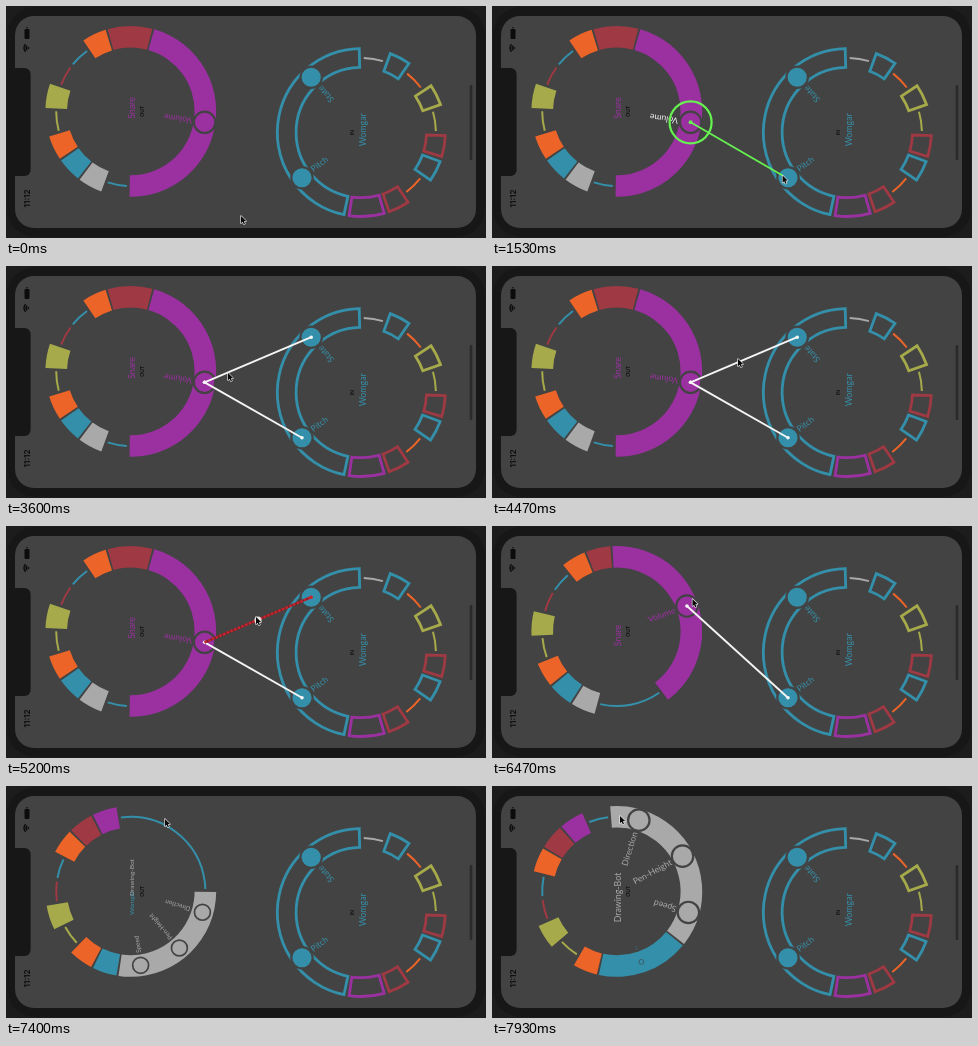
These frames come from a looping animation (480 px wide and 232 px high, 8000 ms). An HTML page with a canvas:

```html
<!DOCTYPE html>
<html lang="en">
<head>
<meta charset="utf-8">
<title>Ring mixer</title>
<style>
html, body { margin: 0; width: 100%; height: 100%; overflow: hidden; background: #181818; }
canvas { display: block; width: 480px; height: 232px; }
</style>
</head>
<body>
<canvas id="stage" width="480" height="232"></canvas>
<script>
const ctx = document.getElementById('stage').getContext('2d');
const LOOP = 8000, UNIT = 18, MID = 74.6, HALF = 10.8;
const BG = '#434343', INK = '#0c0c0c', GREEN = '#66f250', WHITE = '#f4f4f4';
const PURPLE = '#9b30a1', RED = '#9f3943', ORANGE = '#ec6428',
      LIME = '#a6aa4a', BLUE = '#3490aa', GRAY = '#a9a9a9';
const FONT = 'Lato, "Open Sans", sans-serif';

const item = (color, shape, name = '', knobs = []) => ({ color, shape, name, knobs });

const outRing = {
  x: 124.8, y: 105.4, base: 0, tag: 'OUT', tagX: 136,
  items: [
    item(PURPLE, 'fill', 'Snare', ['Volume']),
    item(BLUE, 'line', 'Womgar'),
    item(GRAY, 'fill', 'Drawing-Bot', ['Direction', 'Pen-Height', 'Speed']),
    item(BLUE, 'fill', '', ['Rate']),
    item(ORANGE, 'fill'), item(LIME, 'line'), item(LIME, 'fill'),
    item(RED, 'line'), item(BLUE, 'line'), item(ORANGE, 'fill'), item(RED, 'fill')
  ]
};
const inRing = {
  x: 355.3, y: 126.5, base: 179.3, tag: 'IN', tagX: 346,
  items: [
    item(BLUE, 'box', 'Womgar', ['Pitch', 'State']),
    item(GRAY, 'line'), item(BLUE, 'box'), item(ORANGE, 'line'),
    item(LIME, 'box'), item(LIME, 'line'), item(RED, 'box'),
    item(BLUE, 'box'), item(ORANGE, 'line'), item(RED, 'box'), item(PURPLE, 'box')
  ]
};

// [time, x, y] of the pointer tip
const pointerKeys = [
  [0, 235, 210], [70, 235, 210], [800, 198, 116], [950, 198, 116],
  [1500, 290.5, 169.5], [1750, 292, 170], [2200, 198, 116], [2320, 198, 116],
  [2950, 304, 72], [3130, 304, 72], [3600, 222, 107], [4250, 246, 93],
  [4500, 246, 93], [5200, 250, 91], [5400, 250, 91], [6130, 199, 112]
];
const dragKeys = [[6130, 199, 112], [6200, 200, 104], [6470, 200.5, 73],
  [6930, 184, 46.5], [7400, 159, 33], [7930, 128, 30]];
const turnKeys = [[6180, -0.085], [6470, 0.2], [6930, 0.59], [7400, 1.5], [7900, 2.285]];

const rad = a => (a - 90) * Math.PI / 180;
const clamp = v => Math.max(0, Math.min(1, v));
const ease = v => v * v * (3 - 2 * v);
const grow = focus => ease(clamp((focus - 0.1) / 0.6));
const polar = (ring, a, r) => [ring.x + r * Math.cos(rad(a)), ring.y + r * Math.sin(rad(a))];

function sample(keys, t, shape = v => v) {
  if (t <= keys[0][0]) return keys[0].slice(1);
  for (let i = 1; i < keys.length; i++) {
    const [a, b] = [keys[i - 1], keys[i]];
    if (t < b[0]) {
      const k = shape((t - a[0]) / (b[0] - a[0]));
      return a.slice(1).map((v, n) => v + (b[n + 1] - v) * k);
    }
  }
  return keys[keys.length - 1].slice(1);
}

function disc(x, y, r, fill, stroke, width) {
  ctx.beginPath();
  ctx.arc(x, y, r, 0, 7);
  if (fill) { ctx.fillStyle = fill; ctx.fill(); }
  if (stroke) { ctx.strokeStyle = stroke; ctx.lineWidth = width; ctx.stroke(); }
}

function line(from, to, color, width, dash = []) {
  ctx.strokeStyle = color;
  ctx.lineWidth = width;
  ctx.setLineDash(dash);
  ctx.beginPath();
  ctx.moveTo(...from);
  ctx.lineTo(...to);
  ctx.stroke();
  ctx.setLineDash([]);
}

function text(str, x, y, angle, size, color, align = 'center', weight = 400, font = FONT) {
  if (!str || size < 0.8) return;
  ctx.save();
  ctx.translate(x, y);
  ctx.rotate(angle);
  ctx.font = `${weight} ${size}px ${font}`;
  ctx.textAlign = align;
  ctx.textBaseline = 'middle';
  ctx.fillStyle = color;
  ctx.fillText(str, 0, 0);
  ctx.restore();
}

function panel(x, y, w, h, r, color) {
  ctx.fillStyle = color;
  ctx.beginPath();
  ctx.roundRect(x, y, w, h, r);
  ctx.fill();
}

// Places every item; the one at the turn position gets the wide half circle.
function layout(ring, turn) {
  const n = ring.items.length, first = Math.floor(turn), part = turn - first;
  let a = ring.base - part * UNIT;
  const spans = [];
  for (let i = 0; i < n; i++) {
    const index = (((first + i) % n) + n) % n;
    const focus = i === 0 ? 1 - part : i === 1 ? part : 0;
    const b = a + UNIT + focus * (180 - UNIT);
    spans[index] = { a, b, focus, shift: i === 0 ? part : part - 1 };
    a = b;
  }
  return spans;
}

function segment(ring, { a, b }, { color, shape }) {
  const path = (pad, inset) => {
    ctx.beginPath();
    ctx.arc(ring.x, ring.y, MID + HALF - inset, rad(a + pad), rad(b - pad));
    ctx.arc(ring.x, ring.y, MID - HALF + inset, rad(b - pad), rad(a + pad), true);
    ctx.closePath();
  };
  ctx.fillStyle = ctx.strokeStyle = color;
  if (shape === 'fill') {
    path(0.7, 0);
    ctx.fill();
  } else if (shape === 'box') {
    path(1.8, 1.4);
    ctx.lineWidth = 2.8;
    ctx.stroke();
  } else {
    ctx.lineWidth = 2;
    ctx.beginPath();
    ctx.arc(ring.x, ring.y, MID, rad(a + 1.5), rad(b - 1.5));
    ctx.stroke();
  }
}

const knobAngle = (span, i, n) => span.a + (span.b - span.a) * (i + 0.5) / n;

function drawRing(ring, spans, lit) {
  ring.items.forEach((it, i) => segment(ring, spans[i], it));
  ring.items.forEach((it, i) => {
    const span = spans[i], k = grow(span.focus);
    if (k <= 0) return;
    it.knobs.forEach((label, j) => {
      const a = knobAngle(span, j, it.knobs.length);
      disc(...polar(ring, a, MID), 10.7 * k, it.color, BG, 0.2 + 2 * k);
      const up = Math.cos(a * Math.PI / 180) >= 0;
      text(label, ...polar(ring, a, 62), rad(a) + (up ? 0 : Math.PI), 8.6 * k,
        lit === label ? WHITE : it.color, up ? 'right' : 'left');
    });
    text(it.name, ring.x + 1.6, ring.y - 1.2 + 25.5 * span.shift, -Math.PI / 2, 8.8 * k, it.color);
  });
  text(ring.tag, ring.tagX, ring.y, -Math.PI / 2, 5, '#111', 'center', 700);
}

function phone() {
  ctx.fillStyle = '#1c1c1c';
  ctx.fillRect(0, 0, 480, 232);
  panel(1, 1, 478, 230, 28, '#171717');
  panel(9, 10, 461, 212, 19, BG);
  panel(2, 62, 22.6, 108, 6, '#171717');
  panel(463.7, 79, 2.6, 75, 1.3, '#2a2a2a');
  text('11:12', 21.5, 192.5, -Math.PI / 2, 8.2, INK, 'center', 600, 'Inter, sans-serif');
  panel(18.5, 23, 5, 10, 1.2, INK);
  panel(20, 21.3, 2, 1, 0.5, INK);
  ctx.strokeStyle = INK;
  ctx.lineWidth = 1.6;
  for (const r of [1, 3.2, 5.4]) {
    ctx.beginPath();
    ctx.arc(23.5, 42, r, Math.PI * 0.76, Math.PI * 1.24);
    ctx.stroke();
  }
}

function pointer(x, y) {
  const shape = [[0, 0], [0, 7.2], [1.6, 5.7], [2.8, 8.2], [4, 7.7], [2.9, 5.2], [5.1, 5.1]];
  ctx.beginPath();
  shape.forEach(([dx, dy]) => ctx.lineTo(x + dx, y + dy));
  ctx.closePath();
  ctx.lineJoin = 'round';
  ctx.strokeStyle = '#e8e8e8';
  ctx.lineWidth = 1.3;
  ctx.stroke();
  ctx.lineJoin = 'miter';
  ctx.fillStyle = '#0a0a0a';
  ctx.fill();
}

function link(from, to, k) {
  if (k <= 0) return;
  ctx.globalAlpha = 0.5 + 0.5 * k;
  line(from, to, WHITE, 1.9 * k);
  disc(...from, 1.8 * k, WHITE);
  disc(...to, 1.8 * k, WHITE);
  ctx.globalAlpha = 1;
}

function draw(t) {
  const between = (a, b) => t >= a && t < b;
  const tip = t < 6130 ? sample(pointerKeys, t, ease) : sample(dragKeys, t);
  const left = layout(outRing, sample(turnKeys, t)[0]);
  const right = layout(inRing, -0.06);
  const dragging = between(930, 1820) || between(2300, 3130);

  phone();
  drawRing(outRing, left, dragging ? 'Volume' : '');
  drawRing(inRing, right, '');

  const volume = polar(outRing, knobAngle(left[0], 0, 1), MID);
  const [pitch, state] = [0, 1].map(i => polar(inRing, knobAngle(right[0], i, 2), MID));
  const k = grow(left[0].focus);

  if (t >= 1820) link(volume, pitch, k);
  if (between(3130, 4480)) link(volume, state, k);
  if (between(4480, 5380)) {
    line(volume, state, '#7c2028', 2.4);
    line(volume, state, '#c9252e', 2.4, [2.5, 1.5]);
    disc(...state, 1.8, '#c9252e');
    disc(tip[0] + 2, tip[1] + 3, 3.6, '#e6dcdc');
  }
  if (dragging) {
    disc(...volume, 21, null, GREEN, 2.2);
    line(volume, tip, GREEN, 1.8);
    disc(...volume, 2, GREEN);
  }
  pointer(...tip);
}

const start = performance.now();
function tick() {
  draw((performance.now() - start) % LOOP);
  requestAnimationFrame(tick);
}
tick();
</script>
</body>
</html>
```
